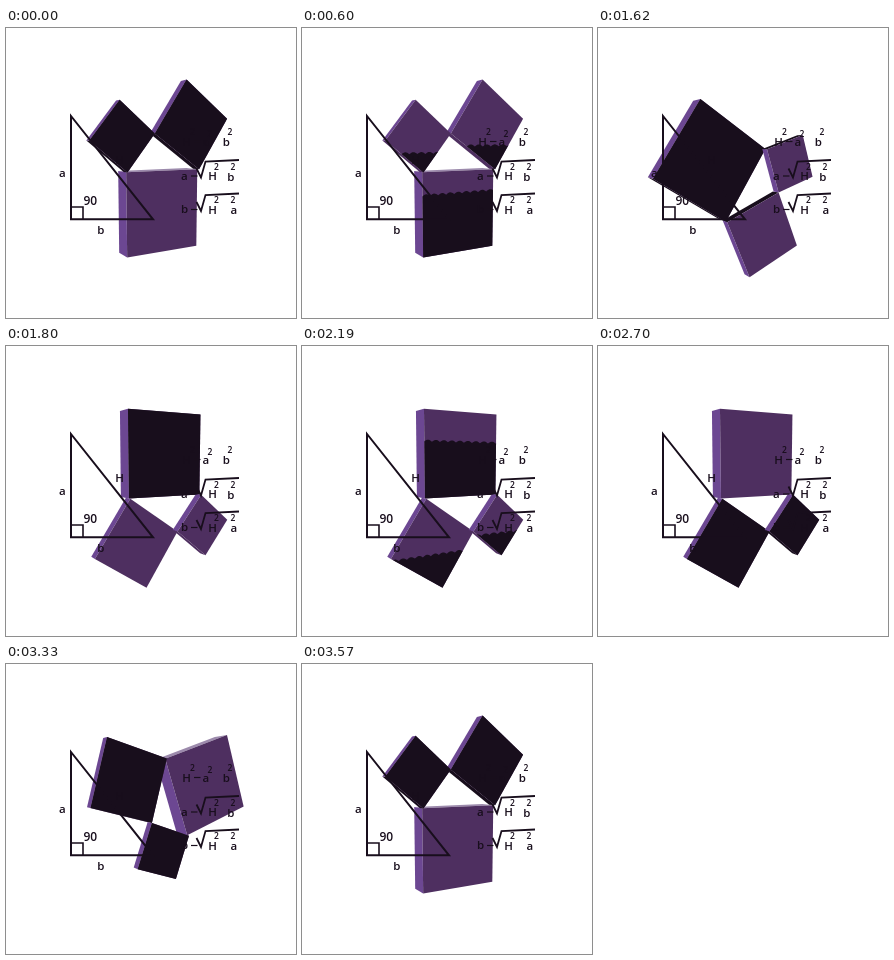
Recreate the animation shown at these times as an HTML page with a canvas. Size 290 by 290 pixels, loop 3600 ms.

```html
<!DOCTYPE html>
<html lang="en">
<head>
<meta charset="utf-8">
<title>Pythagoras with water</title>
<style>
html, body { margin: 0; width: 100%; height: 100%; overflow: hidden; background: #fff; }
canvas { display: block; }
</style>
</head>
<body>
<canvas id="stage" width="290" height="290"></canvas>
<script>
const ctx = document.getElementById('stage').getContext('2d');
const LOOP = 3600, STEP = 30;
const DARK = '#180e1c', FACE = '#4e2f60', SIDE = '#6c4792', SHINE = '#9c8aac';
const HORIZON = 115, SLANT = 0.0016, VANISH = [-69, HORIZON];

const mix = (a, b, k) => a + (b - a) * k;
const smooth = x => x * x * (3 - 2 * x);
const progress = (t, from, to) => Math.max(0, Math.min(1, (t - from) / (to - from)));

// Triangle around its centroid; each square stands on the edge p-q
const P = [-38, 12.3], Q = [46, 12.3], R = [-8, -24.7];
function squareOn(p, q) {
  const dx = q[0] - p[0], dy = q[1] - p[1];
  return [p, q, [q[0] - dy, q[1] + dx], [p[0] - dy, p[1] + dx]];
}
const BOXES = [
  { quad: squareOn(P, Q), near: 0, far: 0.042, top: SHINE },
  { quad: squareOn(Q, R), near: 0.007, far: 0.016, top: DARK },
  { quad: squareOn(R, P), near: 0.007, far: 0.013, top: DARK }
];

// Plane seen at a slant, its left side nearer
function project([x, y]) {
  const m = 1.0112 / (1 + 0.85 * SLANT * x + 0.00035 * y);
  return [155 + 0.85 * x * m, HORIZON + y * m];
}

// Half a turn each time, while the centre drifts down and back up
function pose(t) {
  const first = smooth(progress(t, 1320, 1800)), second = smooth(progress(t, 3150, 3570));
  const f = second || first;
  const angle = Math.PI * (first + second), c = Math.cos(angle), s = Math.sin(angle);
  const easeIn = f * f, easeOut = 1 - (1 - f) ** 2;
  const cx = second ? mix(10.1, -0.8, easeIn) : mix(-0.8, 10.1, easeIn);
  const cy = second ? mix(48, 15.4, easeOut) : mix(15.4, 48, easeOut);
  return ([x, y]) => project([cx + x * c - y * s, cy + x * s + y * c]);
}

// Share of the water that is in the big square
function bigShare(t) {
  const ease = x => (x + smooth(x)) / 2;
  return ease(progress(t, 60, 840)) - ease(progress(t, 1860, 2700));
}

function path(points) {
  ctx.beginPath();
  points.forEach(p => ctx.lineTo(p[0], p[1]));
}

function fill(points, colour) {
  path(points);
  ctx.fillStyle = colour;
  ctx.fill();
}

function line(points, width) {
  path(points);
  ctx.lineWidth = width;
  ctx.strokeStyle = DARK;
  ctx.stroke();
}

function water(quad, level) {
  if (level <= 0) return;
  if (level >= 1) return fill(quad, DARK);
  const xs = quad.map(p => p[0]), ys = quad.map(p => p[1]);
  const left = Math.min(...xs), right = Math.max(...xs);
  const y = mix(Math.max(...ys), Math.min(...ys), level), mid = (left + right) / 2;
  const tilt = (HORIZON - y) * SLANT;
  const surface = [[right, 290], [left, 290]];
  for (let x = left; x <= right + 1; x++)
    surface.push([x, y + 1 + (x - mid) * tilt - 2 * Math.abs(Math.sin((x - left) * Math.PI / 8))]);
  ctx.save();
  path(quad);
  ctx.clip();
  fill(surface, DARK);
  ctx.restore();
}

function drawBox({ quad, near, far, top }, place, level) {
  const shift = k => p => p.map((v, i) => mix(v, VANISH[i], k));
  const flat = quad.map(place), front = flat.map(shift(-near)), back = flat.map(shift(far));
  front.forEach((p, i) => {
    const j = (i + 1) % 4, q = front[j];
    const len = Math.hypot(q[0] - p[0], q[1] - p[1]);
    const nx = (q[1] - p[1]) / len, ny = (p[0] - q[0]) / len;
    if (nx * (back[i][0] - p[0]) + ny * (back[i][1] - p[1]) <= 0) return;
    const under = level < 0.5 ? FACE : DARK;
    fill([p, q, back[j], back[i]], ny < -0.7 ? top : ny > 0.7 ? under : SIDE);
  });
  fill(front, FACE);
  water(front, level);
}

function text(s, x, y, size = 11.5) {
  ctx.font = '600 ' + size + 'px "Open Sans", "Noto Sans", sans-serif';
  ctx.fillStyle = DARK;
  ctx.fillText(s, x, y);
}
const squared = (x, y) => text('2', x, y, 8.5);
const minus = (x, y) => line([[x, y], [x + 6.5, y]], 1.2);

function rootFormula(left, right, y) {
  text(left, 175, y);
  minus(185, y - 3.5);
  line([[190.5, y - 11], [195, y - 2], [199.5, y - 18], [233, y - 19.5]], 1.8);
  text('H', 202.3, y + 0.7);
  squared(208, y - 10);
  text(right, 221 + (right === 'a' ? 3.5 : 0.3), y + 1);
  squared(224.5, y - 10);
}

function labels() {
  line([[65, 191.3], [65, 88], [147, 191.3], [64, 191.3]], 2);
  line([[65, 179], [77, 179], [77, 191]], 1.6);
  text('90', 77.5, 177, 12);
  text('a', 53, 149);
  text('b', 91.3, 206);
  text('H', 109.3, 135.5);

  text('H', 176.3, 117.5);
  squared(184, 107);
  minus(188, 113.5);
  text('a', 196.5, 117.5);
  squared(201.5, 109);
  text('b', 216.7, 118);
  squared(221.5, 106.5);

  rootFormula('a', 'b', 151.5);
  rootFormula('b', 'a', 185);
}

function draw(now) {
  const t = Math.floor(now % LOOP / STEP) * STEP;
  const place = pose(t), share = bigShare(t);
  ctx.fillStyle = '#fff';
  ctx.fillRect(0, 0, 290, 290);
  BOXES.forEach((box, i) => drawBox(box, place, i ? 1 - share : share));
  labels();
}

let start;
function tick(now) {
  start ??= now;
  draw(now - start);
  requestAnimationFrame(tick);
}
draw(0);
requestAnimationFrame(tick);
</script>
</body>
</html>
```
